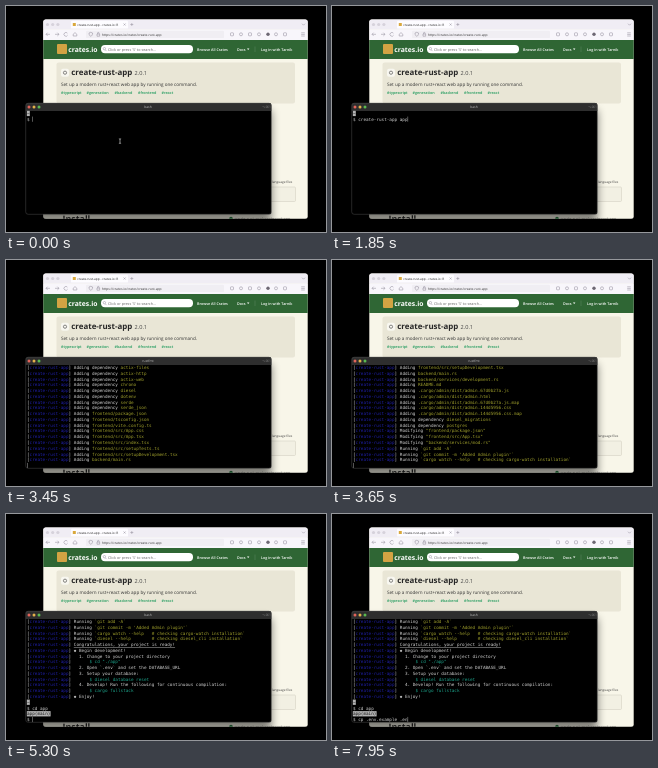
Write an HTML page that moves like this. It is 320 px wide and 226 px high and loops after 8000 ms.

```html
<!DOCTYPE html>
<html lang="en">
<head>
<meta charset="utf-8">
<title>Terminal demo</title>
<style>
  html, body { margin: 0; width: 100%; height: 100%; overflow: hidden; background: #000; }
  svg { display: block; width: 320px; height: 226px; }
  text { font-family: "Open Sans", "Noto Sans", sans-serif; text-rendering: geometricPrecision; white-space: pre; }
  .bold { font-weight: 700; }
  .nav { font-size: 3.7px; font-weight: 600; fill: #fff; }
  .tag { font-size: 3.75px; font-weight: 600; fill: #1d9a5c; }
  .icon { fill: none; stroke: #9c98a4; stroke-width: .6; }
  .term text { font: 4.32px "DejaVu Sans Mono", monospace; fill: #d2d2d2; }
  .term .bar { font: 3.3px "Open Sans", sans-serif; fill: #c0c0c0; }
  .term .blue { fill: #1f1fa8; }
  .term .yellow { fill: #a0a02c; }
  .term .teal { fill: #1ca38a; }
  .term .dark { fill: #111; }
  .term .line { text-decoration: underline; }
</style>
</head>
<body>
<svg viewBox="0 0 320 226">
  <defs>
    <clipPath id="page"><rect x="37.3" y="13.5" width="264.4" height="199.3" rx="2.5"/></clipPath>
    <clipPath id="shell"><rect x="19.5" y="97" width="246" height="111.5" rx="2.5"/></clipPath>
    <filter id="soft" x="-10%" y="-20%" width="120%" height="140%"><feGaussianBlur stdDeviation="4.5"/></filter>
  </defs>

  <g clip-path="url(#page)">
    <rect x="37" y="13" width="265" height="200" fill="#f8f6e9"/>
    <rect x="37" y="13" width="265" height="10.5" fill="#f0edf4"/>
    <rect x="37" y="23.5" width="265" height="10.5" fill="#f8f6fb"/>
    <g fill="#d6d2db">
      <circle cx="41.5" cy="18.5" r="1.6"/>
      <circle cx="46.7" cy="18.5" r="1.6"/>
      <circle cx="51.9" cy="18.5" r="1.6"/>
    </g>
    <rect x="65" y="14.8" width="57" height="7.8" rx="1.2" fill="#fdfcff"/>
    <rect x="66.8" y="17" width="3" height="3" fill="#d9a83c"/>
    <text x="71.2" y="19.8" font-size="3.15" fill="#222">create-rust-app - crates.io: R</text>
    <path class="icon" d="M117.6 17.5l2 2m0-2l-2 2M124.3 18.5h3m-1.5-1.5v3M296 17.7l1.5 1.5 1.5-1.5"/>
    <path class="icon" d="M44 28.3h-4m1.6-1.6l-1.6 1.6 1.6 1.6M49 28.3h4m-1.6-1.6l1.6 1.6-1.6 1.6M61.4 27.2a1.9 1.9 0 1 0 .2 2M67.2 28.2l1.8-1.6 1.8 1.6v1.8h-3.6z"/>
    <rect x="80" y="24.7" width="138" height="7.4" rx="1.2" fill="#f0eef3"/>
    <path class="icon" d="M83 27l1.8-.7 1.8.7c0 2-.8 2.8-1.8 3.4-1-.6-1.8-1.4-1.8-3.4zM91 28h2.6v2.2H91zm.5 0v-.8a.8.8 0 0 1 1.6 0v.8"/>
    <text x="96" y="29.7" font-size="3.3" fill="#333">https://crates.io/crates/create-rust-app</text>
    <g id="tools"></g>

    <rect x="37" y="34" width="265" height="19" fill="#2f6634"/>
    <rect x="51" y="38" width="10" height="10" rx="1" fill="#d3a343"/>
    <text class="bold" x="62.3" y="45.9" font-size="6.8" fill="#fff">crates.io</text>
    <rect x="95" y="39" width="92" height="8.2" rx="4" fill="#fff"/>
    <path class="icon" d="M99.3 43.9l1.2 1.2M99.6 42.7a1.2 1.2 0 1 1-2.4 0 1.2 1.2 0 1 1 2.4 0"/>
    <text x="102" y="44.5" font-size="3.75" fill="#666">Click or press 'S' to search...</text>
    <text class="nav" x="191" y="44.6">Browse All Crates</text>
    <text class="nav" x="231" y="44.6">Docs</text>
    <path d="M241 42.6h2.4l-1.2 1.5z" fill="#fff"/>
    <path d="M249 40.5v5.5" stroke="#5d8a60" stroke-width=".5"/>
    <text class="nav" x="255" y="44.6">Log in with Tarnik</text>

    <rect x="50.5" y="56.5" width="238.5" height="41" rx="2" fill="#e9e6d6"/>
    <rect x="55" y="62.7" width="8" height="8" rx="2" fill="#f8f7f0"/>
    <circle cx="59" cy="66.7" r="1.6" fill="none" stroke="#555" stroke-width=".7"/>
    <text class="bold" x="65.3" y="69.3" font-size="7.9" fill="#262626">create-rust-app</text>
    <text x="128.5" y="69.3" font-size="5.6" fill="#444">2.0.1</text>
    <text x="55" y="79.8" font-size="4.6" fill="#333">Set up a modern rust+react web app by running one command.</text>
    <text class="tag" x="55" y="87.5">#typescript</text>
    <text class="tag" x="80.5" y="87.5">#generation</text>
    <text class="tag" x="108.5" y="87.5">#backend</text>
    <text class="tag" x="132" y="87.5">#frontend</text>
    <text class="tag" x="155.5" y="87.5">#react</text>
    <text x="266" y="177" font-size="3.2" fill="#444">language files</text>
    <rect x="200" y="181" width="89.5" height="14.5" rx="1" fill="#f2f0e3" stroke="#d5d2c3" stroke-width=".6"/>
    <text class="bold" x="56.5" y="215.7" font-size="8.9" fill="#262626">Install</text>
    <circle cx="225" cy="212.6" r="1.8" fill="#2f7a45"/>
    <text x="228.5" y="214.3" font-size="3.8" fill="#444">create-rust-app/create-rust-app</text>
    <rect x="19.5" y="104" width="246" height="112" rx="3" fill="#000" opacity=".5" filter="url(#soft)"/>
  </g>

  <g class="term">
    <g clip-path="url(#shell)">
      <rect x="19.5" y="97" width="246" height="111.5" fill="#000"/>
      <rect x="19.5" y="97" width="246" height="8" fill="#2e2e2e"/>
      <circle cx="23" cy="101" r="1.5" fill="#e2645a"/>
      <circle cx="28" cy="101" r="1.5" fill="#e3b04a"/>
      <circle cx="33" cy="101" r="1.5" fill="#5bb950"/>
      <text class="bar" id="title" y="102.2" text-anchor="middle"></text>
      <path id="bell" d="M144.4 102.4q.7-.6.7-1.7a1.4 1.4 0 0 1 2.8 0q0 1.1.7 1.7zm1.4.2a.7.7 0 0 0 1.4 0z" fill="#e0b93f"/>
      <text class="bar" x="256" y="102.2" style="fill:#777">⌥⌘1</text>
      <g id="rows"></g>
    </g>
    <rect x="19.7" y="97.2" width="245.6" height="111.1" rx="2.5" fill="none" stroke="#4a4a4a" stroke-width=".5"/>
  </g>
  <path id="mouse" d="M112.9 132.7q1.1 0 1.1.8v3.2q0 .8-1.1.8m2.2-4.8q-1.1 0-1.1.8m0 3.2q0 .8 1.1.8" fill="none" stroke="#ddd" stroke-width=".6"/>
</svg>
<script>
const LOOP = 8000, STEP = 50, ROWS = 18;
const LEFT = 21, CELL = 2.6, BASE = 109, LEADING = 5.77;
const $ = id => document.getElementById(id);

// Toolbar icons
$("tools").innerHTML = [226, 235, 244, 253, 262, 270, 279, 297].map((x, i) =>
  i == 7 ? `<path class="icon" d="M${x - 1.8} 26.8h3.6m-3.6 1.6h3.6m-3.6 1.6h3.6"/>`
  : i == 4 ? `<circle cx="${x}" cy="28.2" r="1.7" fill="#6d6873"/>`
  : i % 2 ? `<circle class="icon" cx="${x}" cy="28.3" r="1.5"/>`
  : `<rect class="icon" x="${x - 1.5}" y="26.8" width="3" height="3" rx=".6"/>`).join("");

// A line is a list of [text, style] spans.
const plain = text => [[text, ""]];
const log = (text, arg = "", style = "yellow", lead = "") =>
  [["[", ""], ["create-rust-app", "blue"], ["] ", ""], [text, lead], [arg, style]];
const add = file => log("Adding ", file);
const dep = name => log("Adding dependency ", name);
const edit = file => log("Modifying ", `"${file}"`);
const run = cmd => log("Running ", `\`${cmd}\``);
const hint = cmd => log("      ", "$ " + cmd, "teal");
const prompt = dir => [[dir, "dark"]];
const shell = text => plain("$ " + text);

const dist = ".cargo/admin/dist/admin";
const intro = [
  log("Please select plugins for your new project:"),
  log("Use UP/DOWN arrows to navigate, SPACE to enable/disable a plugin, and ENTER"),
  plain("to confirm.")
];
const plugins = ["Authentication", "Container", "Admin Portal"];
const start = [log("Creating project ", "app"), run("cargo init")];
const build = [
  ...["actix-files", "actix-http", "actix-web", "chrono", "diesel", "dotenv", "serde", "serde_json"].map(dep),
  ...["package.json", "tsconfig.json", "vite.config.ts", "src/App.css", "src/App.tsx", "src/index.tsx", "src/setupTests.ts"].map(f => add("frontend/" + f)),
  add("frontend/src/setupDevelopment.tsx"),
  add("backend/main.rs"),
  add("backend/services/development.rs"),
  add("README.md"),
  ...[".67d0b27a.js", ".html", ".67d0b27a.js.map", ".144d5956.css", ".144d5956.css.map"].map(f => add(dist + f)),
  dep("diesel_migrations"),
  dep("postgres"),
  edit("frontend/package.json"),
  edit("frontend/src/App.tsx"),
  edit("backend/services/mod.rs"),
  run("git add -A"),
  run("git commit -m 'Added Admin plugin'"),
  run("cargo watch --help   # checking cargo-watch installation")
];
const lastCheck = run("diesel --help        # checking diesel_cli installation");
const finish = [
  log("Congratulations, your project is ready!", "", "", "line"),
  log("◆ Begin development!"),
  log("  1. Change to your project directory"),
  hint('cd "./app"'),
  log("  2. Open `.env` and set the DATABASE_URL"),
  log("  3. Setup your database:"),
  hint("diesel database reset"),
  log("  4. Develop! Run the following for continuous compilation:"),
  hint("cargo fullstack"),
  log("◆ Enjoy!")
];

const titles = [[0, "bash"], [2300, "create-rust-app"], [3050, "cargo"], [3250, "rustfmt"], [3750, "cargo"], [3950, "bash"]];
const edits = [
  [6400, "cp .exa"], [6500, "cp .ex"], [6550, "cp .e"], [6600, "cp ."],
  [7000, "cp .e"], [7200, "cp .en"], [7250, "cp .env"], [7300, "cp .env."], [7350, "cp .env.e"],
  [7450, "cp .env.example"], [7600, "cp .env.example "], [7850, "cp .env.example ."],
  [7900, "cp .env.example .e"], [7950, "cp .env.example .en"]
];
const latest = (table, t) => table.filter(([time]) => time <= t).pop()[1];

// First key at a, last key at b.
function typed(t, a, b, text) {
  if (t < a) return "";
  return text.slice(0, 1 + Math.floor((text.length - 1) * Math.min(1, (t - a) / (b - a))));
}

function screen(t) {
  const command = typed(t, 300, 800, "create-") + typed(t, 900, 1400, "rust-app") + typed(t, 1550, 1850, " app");
  const lines = [prompt("~"), shell(command)];
  if (t < 2000) return lines;
  if (t < 2100) return [...lines, plain("")];
  lines.push(...intro);
  if (t < 2800) {
    const focus = t < 2500 ? 0 : t < 2600 ? 1 : 2;
    plugins.forEach((name, i) => lines.push(
      [[i == focus ? "> " : "  ", "teal"], [`[${i == 2 && t >= 2650 ? "x" : " "}] ${name} Plugin`, ""]]));
    return lines;
  }
  if (t >= 2900) lines.push(start[0]);
  if (t >= 3050) lines.push(start[1]);
  const done = Math.max(0, Math.min(1, (t - 3200) / 450));
  lines.push(...build.slice(0, Math.floor(build.length * done)));
  if (t >= 3800) lines.push(lastCheck);
  if (t < 3950) return [...lines, plain("")];
  lines.push(...finish, prompt("~"), shell(typed(t, 4250, 4750, "cd app")));
  if (t < 4900) return lines;
  if (t < 5000) return [...lines, plain("")];
  const copy = t < 6400 ? typed(t, 5450, 6100, "cp .exam") : latest(edits, t);
  return [...lines, prompt("app(main)"), shell(copy)];
}

const escape = s => s.replace(/&/g, "&amp;").replace(/</g, "&lt;").replace(/>/g, "&gt;");

function drawRow(line, i) {
  const y = BASE + i * LEADING;
  let col = 0, out = "";
  for (const [text, style] of line) {
    const x = LEFT + col * CELL;
    if (style == "dark")
      out += `<rect x="${x - .2}" y="${y - 4.2}" width="${text.length * CELL + .4}" height="5.3" fill="#b4b4b4"/>`;
    if (text) out += `<text class="${style}" x="${x}" y="${y}">${escape(text)}</text>`;
    col += text.length;
  }
  return out;
}

function draw(t) {
  const lines = screen(t).slice(-ROWS), last = lines.length - 1;
  const cols = lines[last].reduce((n, [text]) => n + text.length, 0);
  const cursor = `<rect x="${LEFT + cols * CELL}" y="${BASE + last * LEADING - 4.2}" width=".5" height="5.2" fill="#aaa"/>`;
  const ringing = t >= 6150 && t < 6900;
  $("rows").innerHTML = lines.map(drawRow).join("") + cursor;
  $("title").textContent = latest(titles, t);
  $("title").setAttribute("x", ringing ? 139.5 : 142);
  $("bell").style.display = ringing ? "" : "none";
  $("mouse").style.display = t < 300 ? "" : "none";
}

let shown = -1;
const origin = performance.now();
function tick() {
  const t = Math.floor((performance.now() - origin) % LOOP / STEP) * STEP;
  if (t != shown) draw(shown = t);
  requestAnimationFrame(tick);
}
tick();
</script>
</body>
</html>
```
